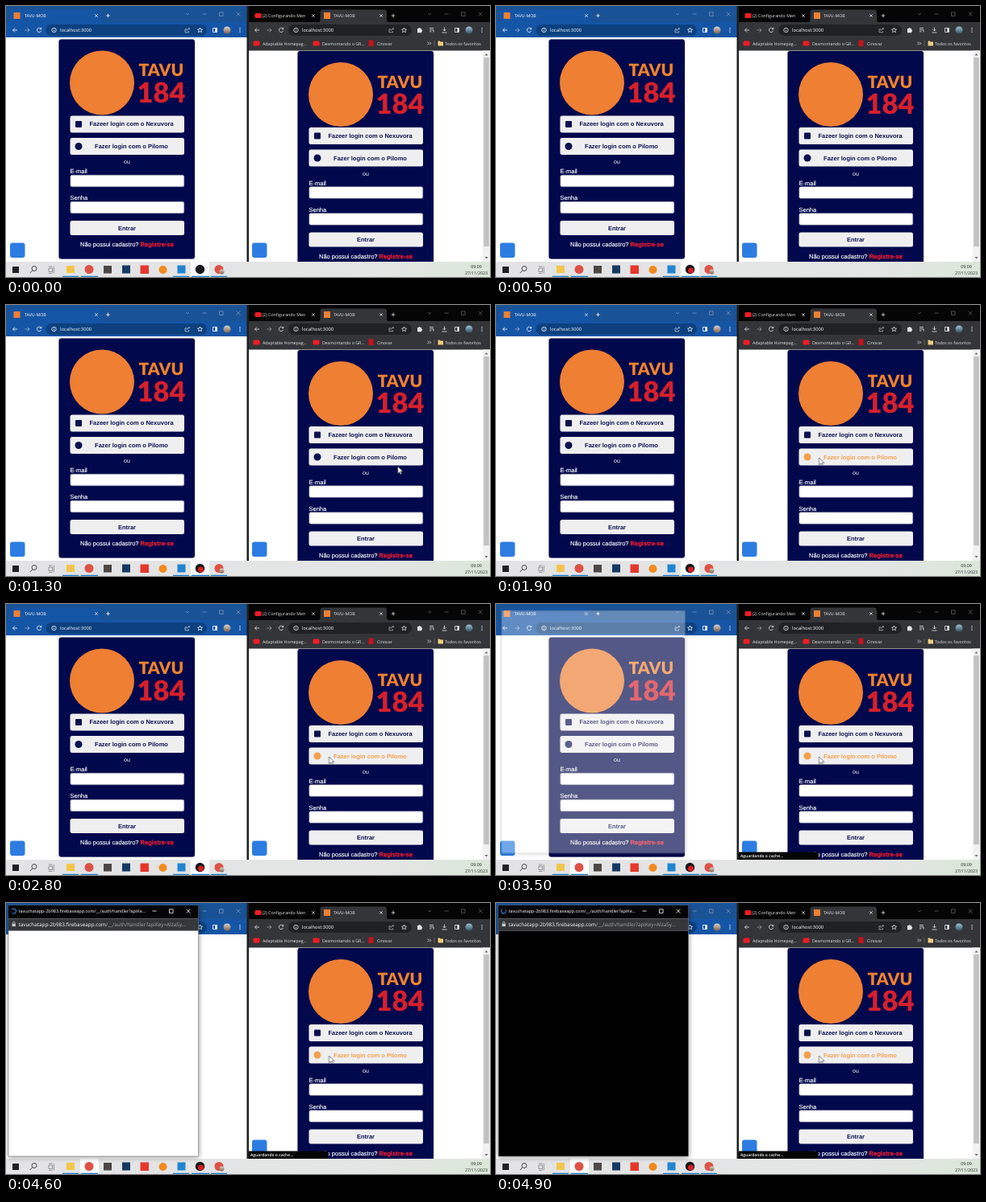
These frames come from a looping animation (600x337 px, 5000 ms). An HTML page:

```html
<!DOCTYPE html>
<html lang="pt-BR">
<head>
<meta charset="utf-8">
<title>Login</title>
<style>
html, body { margin: 0; width: 100%; height: 100%; overflow: hidden; background: #fff; }
svg { display: block; width: 100vw; height: 100vh; }
text { font-family: "Open Sans", sans-serif; font-size: 5.3px; text-rendering: geometricPrecision; }
.form text { font-family: "Liberation Sans", Arial, sans-serif; font-size: 7.5px; fill: #fff; }
.form .btn { font-weight: 700; fill: #0b1150; text-anchor: middle; }
.form .hot { fill: currentColor; }
.form .brand { font-family: Lato, sans-serif; font-weight: 900; }
.form .thick { stroke: #fff; stroke-width: .15; }
.form .link { font-size: 7.6px; font-weight: 700; fill: #ef1c30; stroke: #ef1c30; stroke-width: .25; }
.line { fill: none; stroke: currentColor; stroke-width: .8; }
.dim { opacity: .4; }
.url { font-size: 5.8px; fill: #fff; }
.title { font-size: 5.5px; fill: #fff; }
.addr { font-size: 6.1px; fill: #a5a7ab; }
.addr tspan { fill: #fff; }

/* every track shares one five second loop */
.t { animation: 5s linear infinite; }
.step { animation-timing-function: step-end; }
.hover { color: #0b1150; animation-name: hover; }
.rec { animation-name: rec; }
.before { animation-name: before; }
.after { animation-name: after; }
.chrome { animation-name: chrome; }
.blank { animation-name: blank; }
.loaded { animation-name: loaded; }
.dark { animation-name: dark; }
.cursor { animation-name: cursor; animation-timing-function: ease-out; }
.popup { animation-name: popup; transform-origin: 120.5px 159px; }
.spin { animation: spin 1s linear infinite; transform-origin: 9.5px 10px; }

@keyframes hover { 0% { color: #0b1150; } 30% { color: #f5a04e; } }
@keyframes rec { 0% { opacity: 0; } 8% { opacity: 1; } }
@keyframes before { 0% { opacity: 1; } 68% { opacity: 0; } }
@keyframes after { 0% { opacity: 0; } 68% { opacity: 1; } }
@keyframes chrome { 0% { opacity: 0; } 71.5% { opacity: 1; } }
@keyframes blank { 0% { opacity: 1; } 88% { opacity: 0; } }
@keyframes loaded { 0% { opacity: 0; } 88% { opacity: 1; } }
@keyframes dark { 0% { opacity: 0; } 97.8% { opacity: 1; } }
@keyframes cursor {
  0%, 21.9% { transform: translate(600px, 215px); opacity: 0; }
  22% { transform: translate(600px, 215px); opacity: 1; }
  32%, 100% { transform: translate(400.5px, 190px); opacity: 1; }
}
@keyframes popup {
  0%, 68% { transform: scale(.95); opacity: 0; }
  70% { transform: scale(.967); opacity: .32; }
  72%, 100% { transform: none; opacity: 1; }
}
@keyframes spin { to { transform: rotate(360deg); } }
</style>
</head>
<body>
<svg viewBox="0 0 600 337" preserveAspectRatio="none">
<defs>
  <linearGradient id="bar">
    <stop offset="0" stop-color="#e3e3e5"/><stop offset=".75" stop-color="#e4e5e5"/>
    <stop offset="1" stop-color="#dbe7d9"/>
  </linearGradient>
  <linearGradient id="photo" x2="0" y2="1">
    <stop offset="0" stop-color="#d8d3cd"/><stop offset="1" stop-color="#80604f"/>
  </linearGradient>
  <linearGradient id="photo2" x2="0" y2="1">
    <stop offset="0" stop-color="#9cc4d6"/><stop offset="1" stop-color="#34505c"/>
  </linearGradient>
  <filter id="soft" x="-10%" y="-10%" width="120%" height="120%"><feGaussianBlur stdDeviation="3"/></filter>
  <clipPath id="page"><rect x="301" y="55" width="299" height="263"/></clipPath>

  <g id="form" class="form">
    <rect x="65.5" y="41.5" width="168.5" height="273" rx="3" fill="#02084c" stroke="#000" stroke-opacity=".15"/>
    <circle cx="119" cy="95.5" r="40" fill="#ee7f33"/>
    <text class="brand" x="164.5" y="87" style="font-size:21px;fill:#f0822b">TAVU</text>
    <text class="brand" x="162.5" y="119.5" style="font-size:34.5px;fill:#d6202b">184</text>
    <g fill="#efeff0">
      <rect x="79.5" y="136.5" width="141.5" height="21" rx="2.5"/>
      <rect x="79.5" y="164" width="141.5" height="21" rx="2.5"/>
      <rect x="79.5" y="267" width="141.5" height="18" rx="2.5"/>
    </g>
    <g fill="#fff" stroke="#777a92" stroke-width=".5">
      <rect x="79.8" y="210.2" width="141" height="14.6" rx="2"/>
      <rect x="79.8" y="243.2" width="141" height="14.6" rx="2"/>
    </g>
    <rect x="86" y="143" width="8" height="8" rx="1" fill="#0b1150"/>
    <circle cx="90" cy="174.5" r="4.5" class="hot"/>
    <text class="btn" x="155.5" y="149.3">Fazeer login com o Nexuvora</text>
    <text class="btn hot" x="155.5" y="177">Fazer login com o Pilomo</text>
    <text x="150" y="196" text-anchor="middle" style="font-size:7px">ou</text>
    <text class="thick" x="79.5" y="208.3">E-mail</text>
    <text class="thick" x="79.5" y="241.3">Senha</text>
    <text class="btn" x="150" y="278.5">Entrar</text>
    <text class="thick" x="92" y="299">Não possui cadastro?</text>
    <text class="link" x="166.5" y="299">Registre-se</text>
  </g>

  <g id="ctl" class="line">
    <path d="M-2.5 10H2.5M18.5 7.8h4.6v4.6h-4.6zM39.7 7.7l4.8 4.8M44.5 7.7l-4.8 4.8"/>
  </g>
  <path id="close" class="line" d="M-1.7-1.7l3.4 3.4M1.7-1.7l-3.4 3.4"/>
  <path id="plus" class="line" d="M-2.3 0h4.6M0-2.3v4.6"/>
  <path id="caret" class="line" d="M-2-1l2 2 2-2"/>
  <g id="menu" fill="currentColor">
    <circle cy="-2.3" r=".7"/><circle r=".7"/><circle cy="2.3" r=".7"/>
  </g>
  <g id="nav" class="line">
    <path d="M14 30H8.5M11 27.5L8.5 30l2.5 2.5"/>
    <path d="M23.5 30H29M26.5 27.5L29 30l-2.5 2.5" opacity=".55"/>
    <path d="M43.4 28.4a2.7 2.7 0 1 0 .3 2.4M43.8 26.8v2h-2"/>
    <circle cx="59.5" cy="30" r="2.7"/><path d="M59.5 29.6v1.8M59.5 28.2v.6"/>
  </g>
  <g id="marks" class="line">
    <path d="M-1-1.2h-2v4h4.6v-1.6M-1 1c.3-2 1.4-2.8 3.4-2.8M1.3-3.2l1.4 1.4-1.4 1.4" opacity=".7"/>
    <path d="M15.5-3l.9 2 2.1.2-1.6 1.4.5 2.1-1.9-1.1-1.9 1.1.5-2.1-1.6-1.4 2.1-.2z"/>
  </g>
  <g id="panel">
    <path class="line" d="M-2.5-2.5h5v5h-5z"/><path d="M.3-2.5h2.2v5H.3z" fill="currentColor"/>
  </g>
</defs>

<rect width="600" height="337" fill="#fff"/>

<!-- left browser -->
<g color="#fff">
  <rect width="299" height="20" fill="#1a5296"/>
  <path d="M2 20q2 0 2-3V8q0-3.5 3.5-3.5H114q3.5 0 3.5 3.5v9q0 3 2 3z" fill="#1555a6"/>
  <rect y="20" width="299" height="19" fill="#1555a6"/>
  <rect x="49.5" y="23" width="199.5" height="14" rx="7" fill="#0c407f"/>
  <rect x="9.5" y="8" width="8" height="8" fill="#ee7f33"/>
  <text x="23" y="14" fill="#fff">TAVU-MOB</text>
  <use href="#close" x="112" y="12"/><use href="#plus" x="126.5" y="12"/>
  <g class="dim"><use href="#caret" x="225" y="10"/><use href="#ctl" x="246"/></g>
  <use href="#nav"/>
  <text class="url" x="67" y="32">localhost:3000</text>
  <use href="#marks" x="225" y="30"/><use href="#panel" x="259" y="30"/>
  <circle cx="274" cy="30" r="4.5" fill="url(#photo)"/>
  <use href="#menu" x="290" y="30"/>
</g>
<use href="#form" color="#0b1150"/>
<rect x="5" y="294.5" width="18.5" height="18.5" rx="3" fill="#2d7ce2"/>

<!-- right browser -->
<rect x="298.5" width="2.5" height="318" fill="#1d1e20"/>
<g color="#e4e5e7" fill="#e4e5e7">
  <rect x="301" width="299" height="20" fill="#050505"/>
  <path d="M387 20q2.500 0 2.500-3V8q0-3.500 3.500-3.500h75.500q3.500 0 3.500 3.500v9q0 3 2.500 3z" fill="#343539"/>
  <rect x="301" y="20" width="299" height="35.5" fill="#343539"/>
  <rect x="350" y="23" width="153" height="14" rx="7" fill="#202124"/>
  <rect x="308.5" y="9" width="8" height="6" rx="1.5" fill="#f01c24"/>
  <text x="317.5" y="14">(2) Configurando Men</text>
  <use href="#close" x="381" y="12"/>
  <rect x="394" y="8" width="8" height="8" fill="#ee7f33"/>
  <text x="406" y="14">TAVU-MOB</text>
  <use href="#close" x="465" y="12"/><use href="#plus" x="480" y="12"/>
  <g class="dim"><use href="#caret" x="525" y="10"/><use href="#ctl" x="546"/></g>
  <use href="#nav" x="300"/>
  <text class="url" x="367" y="32">localhost:3000</text>
  <use href="#marks" x="478" y="30"/>
  <path d="M510 28h1.600a1 1 0 0 1 2 0h1.600v1.700a1 1 0 0 1 0 2v1.500H510z"/>
  <path class="line" d="M525 27.500h5M525 29.700h5M525 31.900h2.500M530 29.700v3"/>
  <path class="line" d="M543.500 26.500v4.500M541.500 29l2 2 2-2M540.500 33h6"/>
  <use href="#panel" x="559" y="30"/>
  <circle cx="574" cy="30" r="4.5" fill="url(#photo2)"/>
  <use href="#menu" x="590" y="30"/>
  <g fill="#f01c24">
    <rect x="306.500" y="43.500" width="8" height="6" rx="1.500"/>
    <rect x="380.500" y="43.500" width="8" height="6" rx="1.500"/>
    <rect x="449.500" y="42.500" width="6" height="7.500" fill="#c5121b"/>
  </g>
  <text x="318" y="48.500">Adaptable Homepag...</text>
  <text x="392" y="48.500">Desmontando o GR...</text>
  <text x="460" y="48.500">Cinovar</text>
  <path class="line" d="M522.500 44.700l1.800 1.800-1.800 1.800M525 44.700l1.800 1.800-1.800 1.800"/>
  <path d="M531 43v7" stroke="#77797d" stroke-width=".6"/>
  <path d="M535.500 43.500h2.200l.9 1h3.400v5h-6.500z" fill="#f0cd7c"/>
  <text x="544" y="48.500">Todos os favoritos</text>
</g>
<g clip-path="url(#page)">
  <use href="#form" class="t step hover" x="296" y="14.5"/>
  <rect x="591" y="55.5" width="9" height="263" fill="#f1f1f1"/>
  <rect x="592.2" y="64" width="6.6" height="235" fill="#c2c2c2"/>
  <path d="M593.5 61.5l2-2.5 2 2.5zM593.5 312l2 2.5 2-2.5z" fill="#6b6b6b"/>
  <rect x="305" y="294.5" width="18.5" height="18.5" rx="3" fill="#2d7ce2"/>
  <g class="t step after">
    <path d="M301 308.500h96q2.500 0 2.500 2.500v7H301z" fill="#050506"/>
    <text x="303" y="315" fill="#fff" font-weight="600" style="font-size:5px">Aguardando o cache...</text>
  </g>
</g>

<!-- taskbar -->
<rect y="318" width="600" height="19" fill="url(#bar)"/>
<rect class="t step before" x="229" y="318" width="23" height="19" fill="#fbfbfc"/>
<rect class="t step after" x="92" y="318" width="23" height="19" fill="#fbfbfc"/>
<rect x="8" y="324" width="8" height="8" fill="#222"/>
<g class="line" color="#222">
  <circle cx="35" cy="326.5" r="3"/><path d="M32.8 328.8l-3 3.2"/>
  <path d="M53 326h4.500v4.500H53zM53 324h4.500M53 332.500h4.500M59.300 324v8.500" opacity=".5"/>
</g>
<rect x="75" y="323" width="10" height="9" fill="#f3c64b"/>
<circle cx="103" cy="327.5" r="5.5" fill="#de5246"/>
<rect x="121" y="323" width="10" height="9.5" fill="#4d4746"/>
<rect x="144" y="322.5" width="10" height="10" fill="#153a63"/>
<rect x="166.5" y="322.5" width="10.5" height="10.5" fill="#e5372c"/>
<circle cx="194.5" cy="328" r="5" fill="#f28a1e"/>
<rect x="212.5" y="322.5" width="10" height="10" fill="#2285d0"/>
<circle cx="240.5" cy="327.5" r="5.7" fill="#17171a"/>
<circle class="t step rec" cx="241.5" cy="329" r="3.5" fill="#d81f22"/>
<circle cx="264" cy="327.5" r="5.5" fill="#de5246"/>
<circle cx="267.5" cy="330.5" r="3" fill="url(#photo)"/>
<path d="M70 336.300h20M93 336.300h21M207 336.300h20M230 336.300h22M254 336.300h20" stroke="#1f7fd0" stroke-width="1.3"/>
<g fill="#222" text-anchor="middle">
  <text x="583" y="325.5">09:09</text>
  <text x="583" y="334">27/11/2023</text>
</g>

<!-- sign-in window -->
<g class="t popup">
  <rect x="3" y="5" width="236" height="311" fill="#000" opacity=".45" filter="url(#soft)"/>
  <rect x="3" y="3" width="235.5" height="312" fill="#fff" stroke="#777" stroke-width=".6"/>
  <g class="t step chrome" color="#fff">
    <rect x="3" y="3" width="235.5" height="16.5" fill="#050505"/>
    <rect x="3" y="19.5" width="235.5" height="15" fill="#36373a"/>
    <use href="#ctl" x="184"/>
    <g class="t step blank">
      <path class="spin" d="M7 8.500a3 3 0 0 1 2.500-1.500" fill="none" stroke="#4a86d8"/>
      <text class="title" x="15.5" y="12.3">Sem título - Pilomo Velant</text>
      <g class="line" color="#b5b7ba"><circle cx="12" cy="26.5" r="2.6"/><path d="M12 26.100v1.800M12 24.700v.6"/></g>
      <text class="addr" x="20" y="28.5">about:<tspan>blank</tspan></text>
    </g>
    <g class="t step loaded">
      <path class="spin" d="M9.500 7a3 3 0 1 0 3 3" fill="none" stroke="#3f83e6" stroke-width="1.1"/>
      <text class="title" x="15.5" y="12.3">tavuchatapp-2b983.firebaseapp.com/__/auth/handler?apiKe...</text>
      <path d="M7.500 25.500h4.400v3.600H7.500z" fill="#c5c7ca"/>
      <path class="line" color="#c5c7ca" d="M8.400 25.500v-1a1.300 1.300 0 0 1 2.600 0v1"/>
      <text class="addr" x="15.5" y="28.5" style="font-size:6.35px"><tspan>tavuchatapp-2b983.firebaseapp.com</tspan>/__/auth/handler?apiKey=AIzaSy...</text>
    </g>
    <rect class="t step dark" x="3.3" y="34.5" width="235" height="280.3"/>
  </g>
</g>

<path class="t cursor" d="M0 0v8.800l2-1.900 1.300 3 1.500-.7-1.300-2.900h2.800z" fill="#fff" stroke="#333" stroke-width=".6"/>
</svg>
</body>
</html>
```
